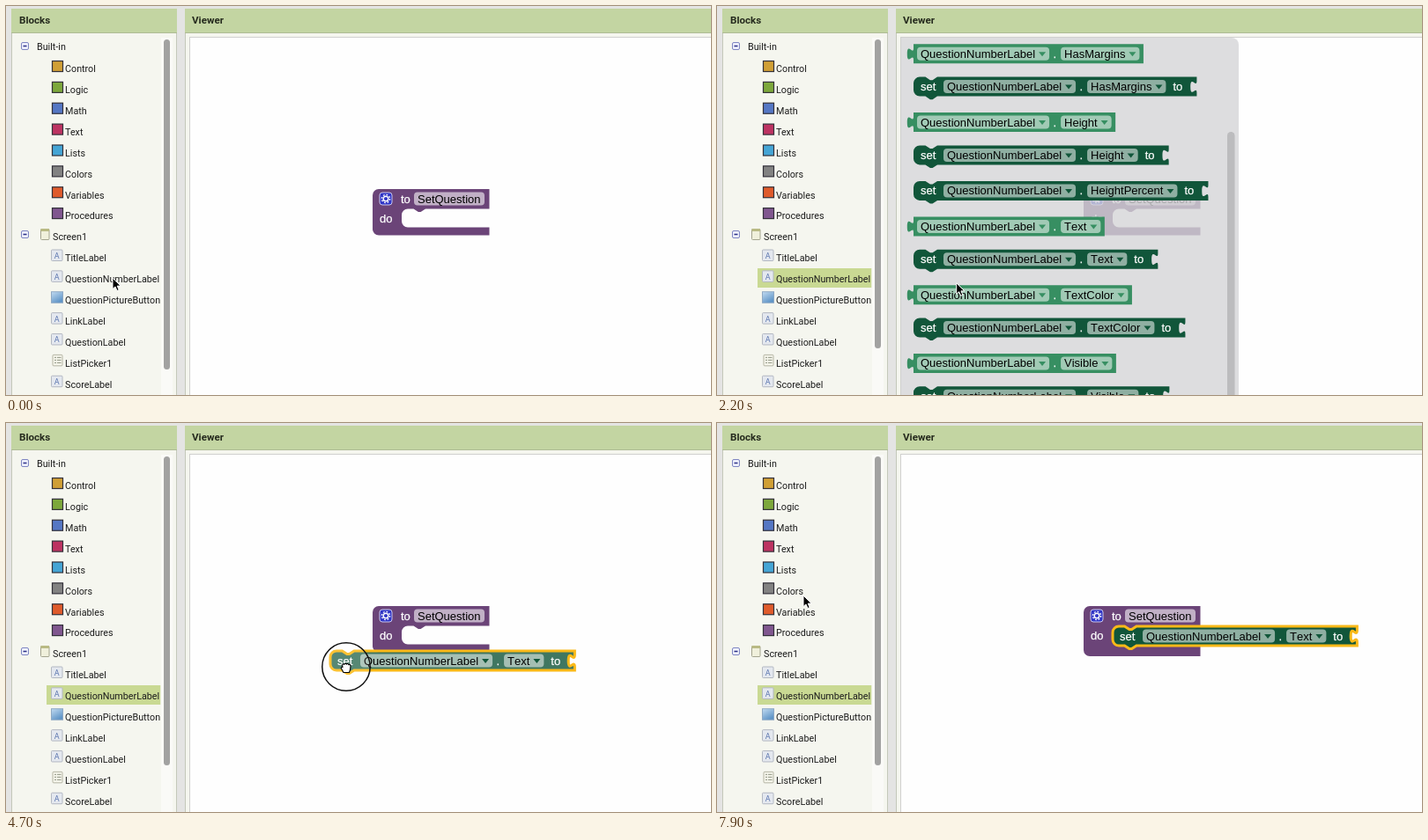
These frames come from a looping animation (800x442 px, 8000 ms). An HTML page:

```html
<!DOCTYPE html>
<html lang="en">
<head>
<meta charset="utf-8">
<title>Block editor</title>
<style>
  html, body { margin: 0; width: 100%; height: 100%; overflow: hidden; background: #e4e4e3; }
  svg { display: block; width: 800px; height: 442px; }
  .ui { font: 10.75px Roboto, sans-serif; fill: #1c1c1c; }
  .head { font: bold 11.6px Roboto, sans-serif; fill: #262b1e; }
  .code { font: 13px "Liberation Sans", Arial, sans-serif; font-kerning: none; fill: #000; }
  .word { fill: #fff; stroke: #fff; stroke-width: .25; }
  .hot > .body { stroke: #fab918; stroke-width: 3; }
  .held > .body { fill-opacity: .8; }
  .hot.field > .box:first-of-type { stroke: #fff; stroke-width: 2; }
</style>
</head>
<body>
<svg id="stage" viewBox="0 0 800 442" xmlns="http://www.w3.org/2000/svg"></svg>
<script>
const LOOP = 8000, STEP = 100;
const OPEN = 1100, PRESS = 4000, RELEASE = 6200;
const SET = '#11563a', GET = '#378f62', PURPLE = '#6b4478';
const LABEL = 'QuestionNumberLabel';

// Pointer stops: time, x, y
const PATH = [
  [0, 121, 309], [1100, 121, 309], [1700, 268, 316], [2000, 268, 316],
  [2500, 278.5, 312.5], [2700, 278.5, 312.5], [3500, 262, 208], [3700, 262, 208],
  [PRESS, 241, 209], [4700, 386, 277], [5400, 472, 253], [5600, 467, 249.5],
  [6800, 467, 249.5], [7800, 98, 196]
];
const SCROLL = [[1900, 0], [2400, 242]];

const pen = document.createElement('canvas').getContext('2d');
pen.font = '13px "Liberation Sans", Arial, sans-serif';
pen.fontKerning = 'none';
const width = s => pen.measureText(s).width;

const rect = (x, y, w, h, fill, more = '') =>
  `<rect x="${x}" y="${y}" width="${w}" height="${h}" fill="${fill}" ${more}/>`;
const path = (d, more = '') => `<path d="${d}" ${more}/>`;
const text = (x, y, s, cls = 'ui') => `<text x="${x}" y="${y}" class="${cls}">${s}</text>`;
const at = (x, y) => `translate(${x} ${y})`;

function track(stops, t) {
  const n = stops.findIndex(s => s[0] > t);
  if (n === 0) return stops[0].slice(1);
  if (n < 0) return stops[stops.length - 1].slice(1);
  const a = stops[n - 1], b = stops[n];
  const u = (t - a[0]) / (b[0] - a[0]), e = u * u * (3 - 2 * u);
  return a.slice(1).map((v, i) => v + (b[i + 1] - v) * e);
}

// Blocks have their left edge at x = 0 and are centred on y = 0.
const setShape = w => `M0,-4A7,7 0 0 1 7,-11H13.5l5.4,3.6h2.7l5.4,-3.6H${w}v4.5` +
  `c0,9 -7.2,-7.2 -7.2,6.75s7.2,-2.25 7.2,6.75V11H27l-5.4,3.6h-2.7l-5.4,-3.6H7A7,7 0 0 1 0,4z`;
const getShape = w => `M0,-11H${w}V11H0V7c0,-9 -7.2,7.2 -7.2,-6.75s7.2,2.25 7.2,-6.75z`;

function dropdown(x, s, color) {
  const end = x + 4 + width(s);
  const svg = rect(x, -7.5, end + 16 - x, 15, '#fff', 'class="box" rx="4" fill-opacity=".53"') +
    text(x + 4, 4.5, s, 'code') + path(`M${end + 4},-2h8l-4,5z`, `fill="${color}"`);
  return { svg, end: end + 16 };
}

function block(setter, prop) {
  const color = setter ? SET : GET;
  const a = dropdown(setter ? 34 : 4, LABEL, color);
  const b = dropdown(a.end + 13, prop, color);
  const w = b.end + (setter ? 35 : 4.5);
  const words = setter
    ? text(8, 4.5, 'set', 'code word') + text(b.end + 8, 4.5, 'to', 'code word') : '';
  const svg = path((setter ? setShape : getShape)(w), `class="body" fill="${color}"`) +
    a.svg + text(a.end + 4.5, 4.5, '.', 'code word') + b.svg + words;
  return { svg, w };
}

// Drawer contents: a getter and a setter per property, one setter alone
const items = [];
let nextY = 55.5;
for (const prop of ['BackgroundColor', 'FontSize', 'HasMargins', 'Height', 'HeightPercent',
  'Text', 'TextColor', 'Visible', 'Width']) {
  for (const setter of prop === 'HeightPercent' ? [true] : [false, true]) {
    items.push({ y: nextY, setter, ...block(setter, prop) });
    nextY += setter ? 40.5 : 37.3;
  }
}

function procShape(inner, bottom) {
  return `M416,215a7,7 0 0 1 7,-7H548.5V230.5H476l-5.4,3.6h-2.7l-5.4,-3.6H456a7,7 0 0 0 -7,7` +
    `V${inner - 7}a7,7 0 0 0 7,7H548.5V${bottom}H423a7,7 0 0 1 -7,-7z`;
}

function procedure() {
  return path('', `id="proc" fill="${PURPLE}"`) +
    rect(424, 212, 14, 14, '#3035c6', 'rx="3" stroke="#c9c6ee" stroke-width="1"') +
    '<g fill="none" stroke="#fff"><circle cx="431" cy="219" r="2.8" stroke-width="1.4"/>' +
    '<circle cx="431" cy="219" r="4.6" stroke-width="1.4" stroke-dasharray="1.8 1.8"/></g>' +
    text(448, 223.5, 'to', 'code word') + text(424, 245.5, 'do', 'code word') +
    rect(463, 211.5, 80, 15, '#fff', 'rx="4" fill-opacity=".58"') +
    text(467, 223.5, 'SetQuestion', 'code');
}

const toggle = y => rect(17.5, y - 4, 8, 8, '#eef0fb', 'rx="1.5" stroke="#7f86c2"') +
  path(`M19.5,${y}h4`, 'stroke="#2b2f86" stroke-width="1.4"');

const icons = {
  label: y => rect(51.5, y - 9, 12.5, 12.5, '#e4e8ef', 'rx="1" stroke="#b3b8c2"') +
    `<text x="57.8" y="${y + 1}" text-anchor="middle" style="font:9px Roboto,sans-serif" fill="#5c77b0">A</text>`,
  image: y => rect(51.5, y - 9, 13, 12.5, 'url(#sky)', 'stroke="#8fa9c4"'),
  list: y => rect(53, y - 9, 11, 12.5, '#f4f4ea', 'rx="1" stroke="#b5b5a4"') +
    path(`M55,${y - 6}h2m1,0h4.5M55,${y - 3}h2m1,0h4.5M55,${y}h2m1,0h4.5`, 'stroke="#8f9482"')
};

function sidebar() {
  const groups = [['Control', '#d09f35'], ['Logic', '#7da83c'], ['Math', '#5577c4'],
    ['Text', '#bd3362'], ['Lists', '#45a5d5'], ['Colors', '#828282'],
    ['Variables', '#df5b2c'], ['Procedures', '#80578f']];
  const parts = [['TitleLabel', 'label'], [LABEL, 'label'], ['QuestionPictureButton', 'image'],
    ['LinkLabel', 'label'], ['QuestionLabel', 'label'], ['ListPicker1', 'list'],
    ['ScoreLabel', 'label']];
  const row = (top, i) => top + i * 23.87;
  return toggle(45.5) + text(35, 49.5, 'Built-in') +
    groups.map(([name, color], i) => {
      const y = row(71, i);
      return rect(52.5, y - 8.5, 12, 12, color, 'stroke="#33313a" stroke-width="1.2"') +
        text(67, y + 4.3, name);
    }).join('') +
    toggle(259.5) + rect(39.5, 253.5, 9.5, 12, '#f0f0dc', 'rx="1" stroke="#a3a38e"') +
    rect(39.5, 253, 9.5, 3, '#b9ba84') + text(53, 266, 'Screen1') +
    rect(46, 298, 129.5, 22, '#c9d993', 'id="picked"') +
    parts.map(([name, kind], i) => {
      const y = row(286, i);
      return icons[kind](y) + text(67, y + 4.3, name);
    }).join('');
}

const hand = (id, d) =>
  path(d, `id="${id}" fill="#fff" stroke="#000" stroke-width="1.1" stroke-linejoin="round"`);

const stage = document.getElementById('stage');
stage.innerHTML =
  '<defs><clipPath id="inTree"><rect x="7" y="31" width="168.5" height="411"/></clipPath>' +
  '<clipPath id="inDrawer"><rect x="209" y="36" width="383" height="406"/></clipPath>' +
  '<linearGradient id="sky" x2=".6" y2="1"><stop stop-color="#c3dcf2"/>' +
  '<stop offset="1" stop-color="#5d93c6"/></linearGradient></defs>' +
  rect(0, 0, 800, 442, '#e4e4e3') +
  rect(6.5, 3.5, 187, 450, '#f5f6ef', 'stroke="#c4c8ba"') +
  rect(203.5, 3.5, 610, 450, '#f5f6ef', 'stroke="#c4c8ba"') +
  rect(6, 3, 188, 27, '#c3d5a2') + rect(203, 3, 597, 27, '#c3d5a2') +
  path('M6,30.5H194M203,30.5H800', 'stroke="#aebb95"') +
  text(15, 20.3, 'Blocks', 'head') + text(211, 20.3, 'Viewer', 'head') +
  rect(176, 36, 13, 406, '#fafaf7') + rect(179, 38, 7, 375, '#a2a2a1', 'id="bar" rx="3.5"') +
  `<g clip-path="url(#inTree)">${sidebar()}</g>` +
  rect(208.5, 35.5, 610, 420, '#fefefe', 'stroke="#d0d0ce"') +
  procedure() +
  '<g id="drawer">' +
  path('M209,36H584a8,8 0 0 1 8,8V442H209z', 'fill="#d5d5d8" fill-opacity=".8"') +
  '<g clip-path="url(#inDrawer)"><g id="list">' +
  items.map(b => `<g class="item" transform="${at(223, b.y)}">${b.svg}</g>`).join('') +
  '</g></g>' + rect(579, 38, 8.5, 335, '#bcbcbe', 'id="thumb" rx="4.2"') + '</g>' +
  `<g id="piece" class="hot">${block(true, 'Text').svg}</g>` +
  '<g id="pointer">' +
  '<circle id="ring" r="27.2" fill="#fff" fill-opacity=".12" stroke="#111" stroke-width="1.5"/>' +
  path('M0,0V12.5l3,-2.6 2,4.6 2.2,-.9-2,-4.5h4z',
    'id="arrow" fill="#000" stroke="#fff" stroke-width="1" stroke-linejoin="round"') +
  hand('open', 'M-3.5,7L-6.5,1.5C-7.5,-.5 -5.5,-1 -4.5,.5L-4,1L-5,-3.5C-5.3,-5.3 -3.5,-5.6 -3,-4' +
    'L-2.3,-1.5L-2.2,-6C-2.1,-7.6 -.3,-7.6 -.2,-6L0,-1.8L1,-5.6C1.5,-7 3.2,-6.6 3,-5L2.4,-1.2' +
    'L3.6,-3.6C4.4,-5 6,-4.2 5.5,-2.6C4.6,.5 5,3 3.5,7z') +
  hand('fist', 'M-3,6.5L-5.5,2C-6,.3 -4.8,-.2 -4,.6L-4.3,-1.5C-4.4,-3.4 -2.8,-3.7 -2.2,-2.6' +
    'C-1.8,-4 0,-4 .3,-2.8C1,-3.9 2.6,-3.6 2.7,-2.2C3.6,-3 5,-2.4 5,-.8C5,2 4.5,4 3.5,6.5z') +
  '</g>';

const el = id => document.getElementById(id);
const nodes = [...document.querySelectorAll('.item')];
const show = (id, on) => { el(id).style.display = on ? '' : 'none'; };

function draw(t) {
  const [x, y] = track(PATH, t);
  const [scroll] = track(SCROLL, t);
  const drawer = t >= OPEN && t < PRESS;
  const held = t >= PRESS && t < RELEASE;
  const placed = t >= RELEASE;
  let overBlock = placed && x > 416;

  show('picked', t >= OPEN - STEP);
  el('bar').setAttribute('height', t < OPEN ? 375 : 351);
  show('drawer', drawer);
  el('list').setAttribute('transform', at(0, -scroll));
  el('thumb').setAttribute('y', 38 + scroll * .67);

  items.forEach((b, i) => {
    const dy = y - (b.y - scroll);
    const hot = drawer && Math.abs(dy) < 11.5 && x > 223 && x < 223 + b.w;
    const field = hot && x > (b.setter ? 257 : 227) && Math.abs(dy) < 8.6;
    if (hot && !field) overBlock = true;
    nodes[i].classList.toggle('hot', hot);
    nodes[i].classList.toggle('field', field && dy < 5);
  });

  el('proc').setAttribute('d', placed ? procShape(254, 265) : procShape(251.5, 260.5));
  show('piece', held || placed);
  el('piece').setAttribute('transform', placed ? at(449, 242) : at(x - 18, y - 7));
  el('piece').classList.toggle('held', held);

  el('pointer').setAttribute('transform', at(x, y));
  show('ring', held || (t >= OPEN - 2 * STEP && t < OPEN));
  show('fist', held);
  show('open', overBlock && !held);
  show('arrow', !overBlock && !held);
}

const start = performance.now();
function tick() {
  const t = (performance.now() - start) % LOOP;
  draw(Math.floor(t / STEP) * STEP);
  requestAnimationFrame(tick);
}
tick();
</script>
</body>
</html>
```
